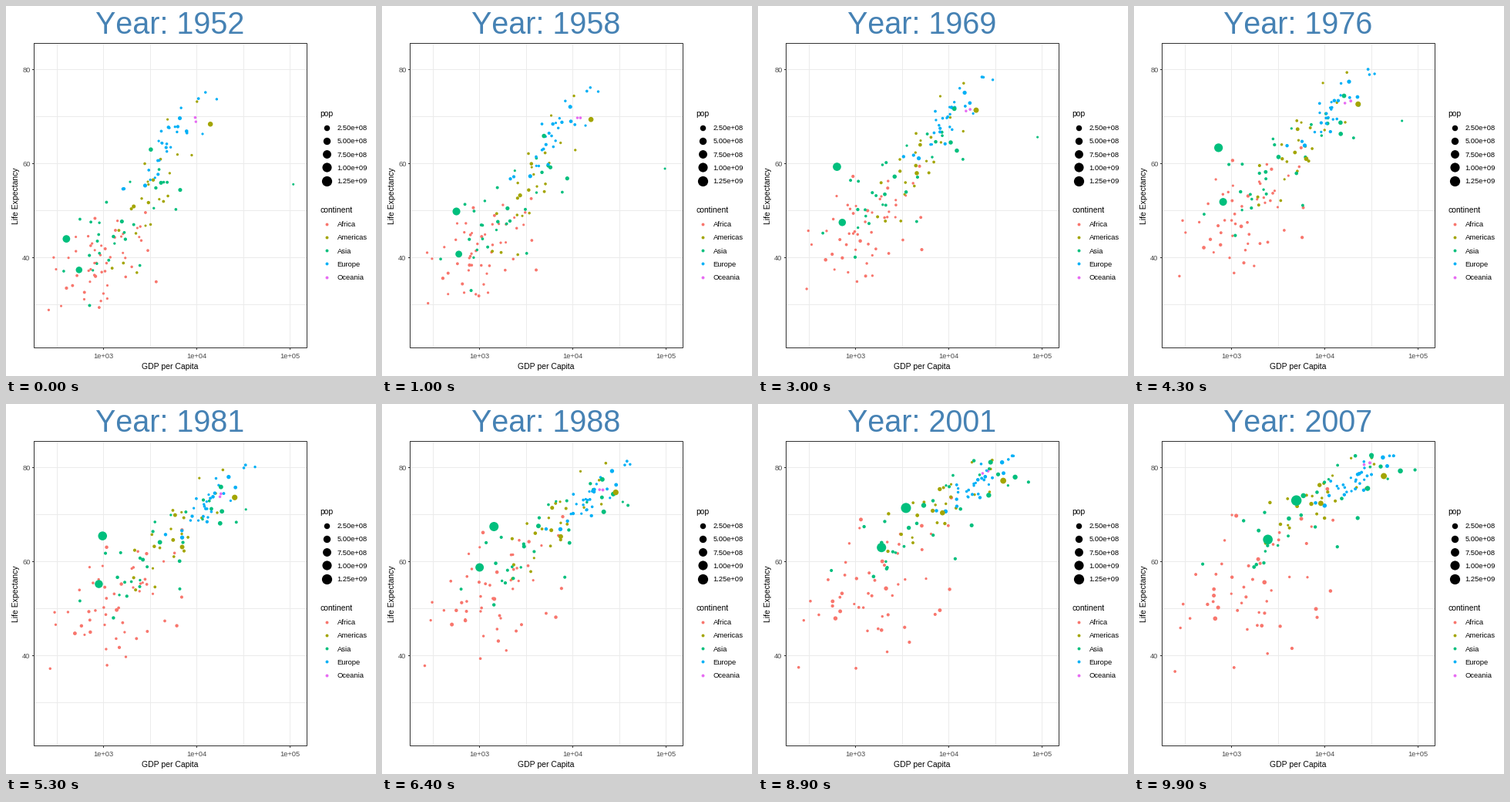
These frames come from a looping animation (480 by 480 pixels, 10 s). A matplotlib script:

```python
import numpy as np
import matplotlib.pyplot as plt
from matplotlib.animation import FuncAnimation

plt.rcParams["font.family"] = "Liberation Sans"
plt.rcParams["text.kerning_factor"] = 6

FRAMES, INTERVAL = 100, 100
DPI = 80
PX = 72 / DPI  # points per pixel
KEYS = np.arange(0, 56, 5)  # survey years after 1952
S = KEYS / 55
EPOCHS = (0, 20, 35, 55)
MAX_POP = 1319  # millions

COLORS = {"Africa": "#F8766D", "Americas": "#A3A500", "Asia": "#00BF7D",
          "Europe": "#00B0F6", "Oceania": "#E76BF3"}

rng = np.random.default_rng(7)
gdps, lives, pops, colors = [], [], [], []


def drift(n, keep):
    """Standard scores per country, sliding slowly from first to last year."""
    z = rng.normal(size=(2, n))
    z = (z - z.mean(1, keepdims=True)) / z.std(1, keepdims=True)
    first = z[0].clip(-2, 2)
    last = (keep * first + np.sqrt(1 - keep ** 2) * z[1]).clip(-2, 2)
    return np.outer(first, 1 - S) + np.outer(last, S)


def crowd(cont, n, gdp, gdp_sd, life, life_sd, corr, pop, growth):
    """Countries scattered around the continent's mean path."""
    wealth, health = drift(n, .85), drift(n, .8)
    health = corr * wealth + np.sqrt(1 - corr ** 2) * health
    wobble = rng.normal(size=(2, n, len(KEYS)))
    g = (np.interp(KEYS, EPOCHS, gdp) + wealth * np.interp(S, (0, 1), gdp_sd)
         + .02 * wobble[0])
    l = (np.interp(KEYS, EPOCHS, life) + health * np.interp(S, (0, 1), life_sd)
         + .3 * wobble[1])
    size = pop * np.exp(rng.normal(size=n).clip(-2, 2))
    gdps.extend(g)
    lives.extend(l.clip(28.8, 82.5))
    pops.extend(np.outer(size, np.ones(len(KEYS))) * growth ** S)
    colors.extend([COLORS[cont]] * n)


def giant(cont, pop, growth, *pts):
    """One prominent bubble through points of (year, gdp, life)."""
    t, g, l = np.array(pts).T
    gdps.append(np.interp(KEYS, t, np.log10(g)))
    lives.append(np.interp(KEYS, t, l))
    pops.append(pop * growth ** S)
    colors.append(COLORS[cont])


crowd("Oceania", 2, (4.01, 4.24, 4.30, 4.47), (.01, .07),
      (69.3, 71.9, 75.3, 80.7), (.2, .5), .9, 4, 2.2)
crowd("Africa", 52, (2.98, 3.13, 3.16, 3.24), (.28, .42),
      (39.1, 47.5, 53.3, 54.8), (5.2, 9.2), .4, 3, 4)
crowd("Americas", 23, (3.52, 3.71, 3.80, 3.95), (.22, .29),
      (53.3, 62.4, 68.1, 73.6), (8.5, 4), .75, 4, 2.7)
crowd("Asia", 29, (3.20, 3.47, 3.67, 3.86), (.33, .55),
      (46.3, 57.3, 64.5, 70.5), (8.5, 7), .7, 8, 2.7)
crowd("Europe", 30, (3.70, 4.06, 4.20, 4.34), (.24, .25),
      (64.4, 70.8, 73.6, 77.6), (5.5, 2.9), .88, 8, 1.4)

giant("Americas", 157, 1.9, (0, 13990, 68.4), (55, 42952, 78.2))
giant("Americas", 57, 3.3, (0, 2109, 50.9), (25, 6660, 61.5), (55, 9066, 72.4))
giant("Asia", .2, 15, (0, 108382, 55.6), (15, 80895, 64.6), (20, 109348, 67.7),
      (30, 31354, 71.3), (55, 47307, 77.6))
giant("Asia", 86, 1.5, (0, 3217, 63), (20, 14779, 73.4), (55, 31656, 82.6))
giant("Asia", 372, 3, (0, 547, 37.4), (35, 977, 58.6), (55, 2452, 64.7))
giant("Asia", 556, 2.37, (0, 400, 44), (5, 576, 50.5), (10, 488, 44.5),
      (15, 613, 58.4), (25, 741, 64), (35, 1379, 67.3), (55, 4959, 73))

gdps, lives, pops = map(np.array, (gdps, lives, pops))


def px_x(log_gdp):
    return 126.5 + 121 * (log_gdp - 3)


def px_y(life):
    return 326.5 - 6.1 * (life - 40)


def area(size):
    """Marker area in square points for a dot size in millimetres."""
    return (.75 * (2.845 * size + .94) * PX) ** 2


def pop_size(pop):
    return 1 + 5 * np.sqrt(np.asarray(pop) / MAX_POP)


fig = plt.figure(figsize=(6, 6), dpi=DPI, facecolor="white")
ax = fig.add_axes([0, 0, 1, 1])
ax.set(xlim=(0, 480), ylim=(480, 0))
ax.axis("off")


def line(xs, ys, color, z):
    """One-pixel line through pixel centres."""
    xs, ys = np.floor(xs) + .5, np.floor(ys) + .5
    ax.plot(xs, ys, color=color, lw=PX, zorder=z, snap=False,
            solid_capstyle="projecting", solid_joinstyle="miter")


def label(x, y, text, size, color="black", **kw):
    kw = {"va": "baseline", **kw}
    return ax.text(x, y, text, fontsize=size * PX, color=color, **kw)


def dots(x, y, s, color):
    return ax.scatter(x, y, s=s, c=color, linewidths=0, zorder=3)


L, R, T, B = 36, 390, 48, 443
SMALL, MEDIUM = 9.4, 10.4
GRID, DARK, GREY = "#EBEBEB", "#333333", "#4D4D4D"

for g in np.arange(2.5, 5.1, .5):
    line([px_x(g)] * 2, [T, B], GRID, 1)
for l in range(30, 81, 10):
    line([L, R], [px_y(l)] * 2, GRID, 1)
for g in (3, 4, 5):
    line([px_x(g)] * 2, [B, B + 2], DARK, 4)
    label(px_x(g), 457, f"1e+0{g}", SMALL, GREY, ha="center")
for l in (40, 60, 80):
    line([L - 2, L], [px_y(l)] * 2, DARK, 4)
    label(31.5, px_y(l) + 4, str(l), SMALL, GREY, ha="right")
line([L, R, R, L, L], [T, T, B, B, T], DARK, 4)

label(212.5, 471, "GDP per Capita", MEDIUM, ha="center")
label(15.5, 246.5, "Life Expectancy", MEDIUM, ha="center", rotation=90,
      rotation_mode="anchor")

label(407, 143, "pop", MEDIUM)
for k in range(5):
    y = 157.5 + 17.28 * k
    pop = 250 * (k + 1)
    digits, exp = (pop / 1000, 9) if pop >= 1000 else (pop / 100, 8)
    dots([415.5], [y], area(pop_size(pop)), "black")
    label(429.5, y + 3.5, f"{digits:.2f}e+0{exp}", SMALL)
label(407, 268, "continent", MEDIUM)
for k, (name, color) in enumerate(COLORS.items()):
    y = 282.5 + 17.28 * k
    dots([415.5], [y], area(1.5), color)
    label(429.5, y + 3.5, name, SMALL)

title = label(115.7, 36, "", 39.5, "#4682B4")
cloud = dots(px_x(gdps[:, 0]), px_y(lives[:, 0]), area(pop_size(pops[:, 0])),
             colors)


def at(values, t):
    """Linear blend between neighbouring survey years."""
    k = min(int(t / 5), len(KEYS) - 2)
    f = t / 5 - k
    return values[:, k] * (1 - f) + values[:, k + 1] * f


def update(i):
    t = 55 * i / (FRAMES - 1)
    cloud.set_offsets(np.column_stack([px_x(at(gdps, t)), px_y(at(lives, t))]))
    cloud.set_sizes(area(pop_size(at(pops, t))))
    title.set_text(f"Year: {round(1952 + t)}")
    return cloud, title


anim = FuncAnimation(fig, update, frames=FRAMES, interval=INTERVAL,
                     repeat=True, repeat_delay=0)
plt.show()
```
